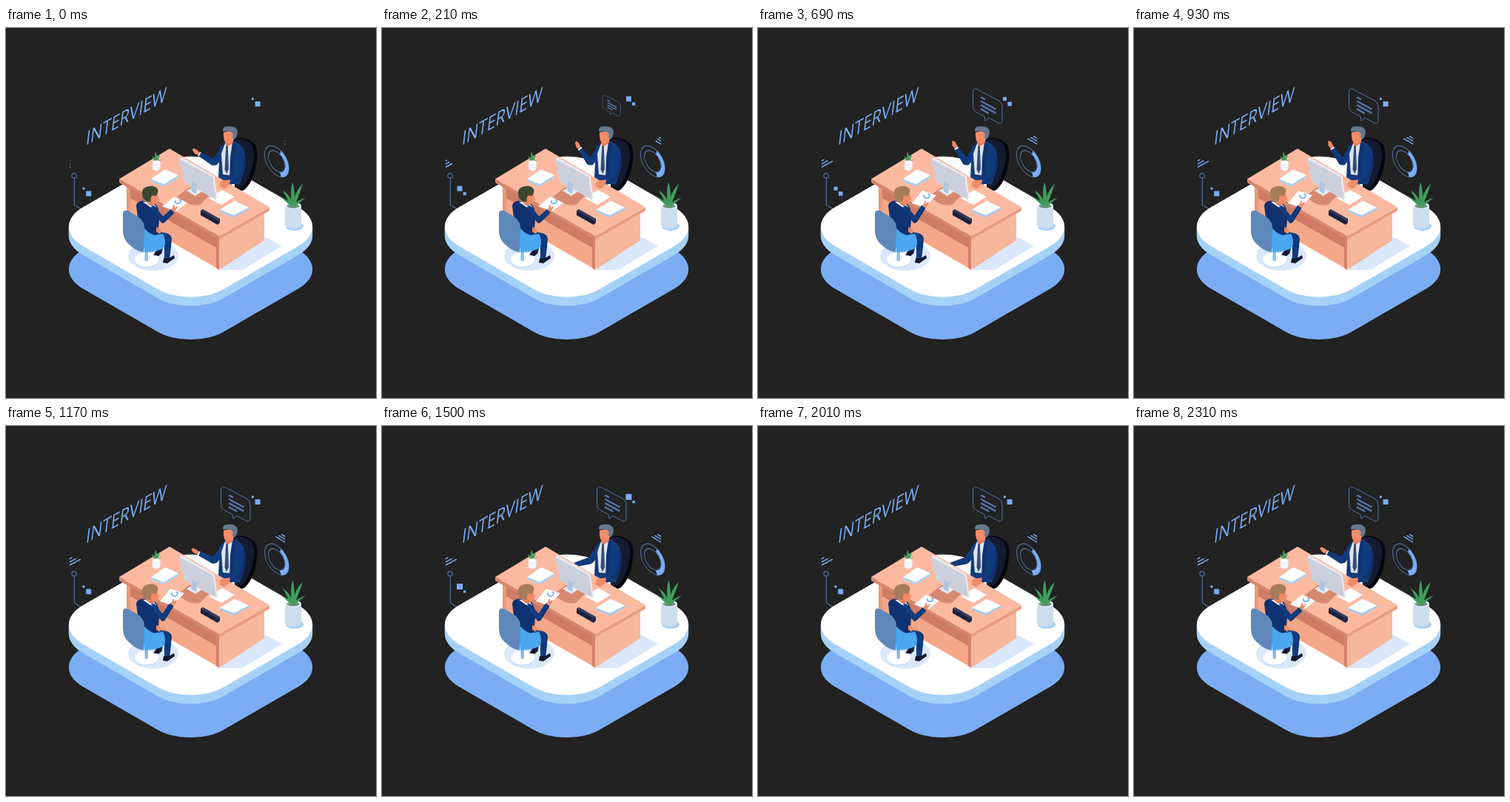
These frames come from a looping animation (500x500 px, 2370 ms). An HTML page with a canvas:

```html
<!DOCTYPE html>
<html lang="en">
<head>
<meta charset="utf-8">
<title>Interview</title>
<style>
  html, body { margin: 0; width: 100%; height: 100%; overflow: hidden; background: #222; }
  canvas { display: block; width: 500px; height: 500px; }
</style>
</head>
<body>
<canvas id="stage" width="500" height="500"></canvas>
<script>
const ctx = document.getElementById('stage').getContext('2d');
const LOOP = 2370;
const BLUE = '#7badf5', PALE = '#a6d1f7', SHADE = '#dbe8fb', NAVY = '#113b7d',
      DEEP = '#0f3270', SKIN = '#f08c67', GREEN = '#3f9d5b', DIM = '#5473a8';

const fill = (d, color) => { ctx.fillStyle = color; ctx.fill(new Path2D(d)); };

function line(d, color, width = 1) {
  ctx.strokeStyle = color;
  ctx.lineWidth = width;
  ctx.stroke(new Path2D(d));
}

function oval(x, y, rx, ry, color, turn = 0) {
  ctx.fillStyle = color;
  ctx.beginPath();
  ctx.ellipse(x, y, rx, ry, turn, 0, Math.PI * 2);
  ctx.fill();
}

function square(x, y, size) {
  ctx.fillStyle = BLUE;
  ctx.fillRect(x - size / 2, y - size / 2, size, size);
}

function within(matrix, draw) {
  ctx.save();
  ctx.transform(...matrix);
  draw();
  ctx.restore();
}

const shifted = (x, y, draw) => within([1, 0, 0, 1, x, y], draw);
const mix = (a, b, k) => a + (b - a) * k;

// Eased value between [time, value] keys
function track(t, keys) {
  if (t <= keys[0][0]) return keys[0][1];
  for (let i = 1; i < keys.length; i++) {
    const [t0, v0] = keys[i - 1], [t1, v1] = keys[i];
    if (t <= t1) {
      const k = (t - t0) / (t1 - t0);
      return mix(v0, v1, k * k * (3 - 2 * k));
    }
  }
  return keys[keys.length - 1][1];
}

function slab(y, color) {
  within([.866, .5, -.866, .5, 249.5, y], () => {
    ctx.fillStyle = color;
    ctx.beginPath();
    ctx.roundRect(-110.3, -110.3, 220.6, 220.6, 52);
    ctx.fill();
  });
}

function platform() {
  slab(326, BLUE);
  for (let y = 280.5; y > 268.5; y--) slab(y, PALE);
  slab(268.5, '#fff');
  fill('M345 283L350 282L373 294.5L319 327H288Z', SHADE);
  oval(199, 308, 34, 20, SHADE);
}

function title() {
  within([.785, -.44, -.12, 1, 107.3, 159], () => {
    ctx.font = '500 27px "Open Sans", "Noto Sans", sans-serif';
    ctx.fillStyle = BLUE;
    ctx.fillText('INTERVIEW', 0, 0);
  });
}

function bubble(scale) {
  if (scale < .01) return;
  within([scale, 0, 0, scale, 310, 103.4], () => {
    ctx.translate(-310, -104);
    line('M290.5 87Q290.5 81 296 83.5L324 98Q330 101 330 107V125Q330 131 325 129L312 122L307 126L306 120L296 115Q290.5 112 290.5 106Z', DIM);
    line('M301 94L307 97.3M301 99.3L321.5 110.3M301 104.7L321.5 115.7M301 110L312 116', DIM, 2.4);
  });
}

function donut() {
  within([.866, .5, 0, 1, 365.8, 180.2], () => {
    ctx.strokeStyle = DIM;
    ctx.lineWidth = 1.1;
    for (const r of [18.8, 13]) {
      ctx.beginPath();
      ctx.arc(0, 0, r, 0, Math.PI * 2);
      ctx.stroke();
    }
    ctx.strokeStyle = BLUE;
    ctx.lineWidth = 5.5;
    ctx.beginPath();
    ctx.arc(0, 0, 16.2, -1.2, 1.2);
    ctx.stroke();
  });
}

function decorations(t) {
  title();
  bubble(track(t, [[0, 0], [390, 1.1], [450, 1.1], [570, 1]]));
  donut();

  const grow = track(t, [[0, .06], [390, 1]]);
  for (const [y, length] of [[179.6, 3.5], [183.8, 8.5], [188, 15]]) {
    const l = length * grow;
    line(`M86 ${y}l${l} ${-l * .54}`, BLUE, 1.5);
  }
  for (const [y, length] of [[149.3, 5], [153, 9], [157, 13]]) {
    const l = length * grow;
    line(`M377.3 ${y}l${-l} ${-l * .58}`, BLUE, 1.4);
  }

  const swap = track(t % (LOOP / 2), [[0, 0], [300, 1], [570, 1], [785, 0]]);
  for (const [x, y] of [[333.4, 95.8], [105, 217]]) {
    square(x, y, mix(3, 8, swap));
    square(x + 6.7, y + 6.8, mix(7, 3.4, swap));
  }

  ctx.strokeStyle = DIM;
  ctx.lineWidth = 1.2;
  ctx.beginPath();
  ctx.arc(92, 199.5, 3.2, 0, Math.PI * 2);
  ctx.stroke();
  line('M92.3 203V239L103 245.5', DIM, 1.1);
}

function interviewer(t) {
  fill('M308 150Q322 145 334 155Q340 160 339.5 172Q338 203 323 218Q317 223 309 216Z', '#04060d');
  fill('M308 151Q320 147 330 155Q336 161 335 172Q333 200 319 216L309 214Z', '#151a31');

  const angle = track(t, [[0, 29], [260, 55], [1030, 55], [1340, -16], [2130, -16], [2335, 29]]) * Math.PI / 180;
  ctx.lineCap = ctx.lineJoin = 'round';
  line('M293 166L282.5 181', NAVY, 9);
  shifted(281.5, 181.5, () => {
    ctx.rotate(angle);
    fill('M2 -4.5L-22 -3V3L-1 5Q5 4 2 -4.5Z', NAVY);
    fill('M-22 -3H-24V3H-22Z', '#e5edf8');
    fill('M-24 -2Q-30 -4.5 -34 -2.5Q-35 0 -32 1L-29 2.5L-24 2Z', SKIN);
  });

  fill('M289 161L297 155L309 153Q319 157 322 166Q326 184 321 197L316 211L302 211L287 203Z', NAVY);
  fill('M296 156L305 154L308 160L304 199L293 198L291 170Z', '#dce5f1');
  fill('M297.5 159L300 159L300 163L301 191L298 197L295.5 191L297 163Z', '#344c78');
  fill('M306 154L311 157L306 200L302 208L303 175Z', DEEP);
  line('M319 176Q320 195 314 201L301 209', DEEP, 8);
  line('M317 170Q318 191 312 199L301 207', NAVY, 7);
  fill('M296 149H307V155L300 160L296 157Z', '#dd7656');
  fill('M294 141L305 139L309 147Q307 155 301 156.5Q295 156 294 148Z', SKIN);
  fill('M293 139.5Q292 133.5 299 133Q311 131.5 313 140Q313 147 308 151L306 148L307 143L303 140Z', '#64798f');
  ctx.lineCap = 'butt';
}

function leaf(x, y, tx, ty, width) {
  const bx = mix(x, tx, .4), by = mix(y, ty, .6);
  fill(`M${x - width / 3} ${y}Q${bx - width} ${by} ${tx} ${ty}Q${bx + width} ${by} ${x + width / 3} ${y}Z`, GREEN);
}

function floorPlant() {
  oval(390, 268, 12, 6, PALE);
  fill('M377 240H399V266Q397 271 388 271Q379 271 377 266Z', '#ccdeee');
  oval(388, 240, 11, 4.5, '#e4eef8');
  oval(388, 240.5, 8.5, 3, '#728f7c');
  for (const [x, y] of [[374, 219], [387, 208], [401, 210], [405, 229], [372, 229]]) leaf(388, 242, x, y, 4.2);
}

function desk() {
  // Left leg, front panel, underside shadow and right leg
  fill('M163 209L168 212V257L163 254Z', '#e39a80');
  fill('M168 212L284 279V324L168 257Z', '#f5a789');
  fill('M168 212L284 279V297L168 230Z', '#cf7b66');
  fill('M284 279L288 281V327L284 324Z', '#d5806a');
  fill('M288 282L349 247V287L288 327Z', '#f7b79c');
  fill('M153 204L288 281V286L153 209Z', '#d8866d');
  fill('M288 281L356 242V247L288 286Z', '#e79c81');
  fill('M153 204L221 163L356 242L288 281Z', '#fbbaa0');
}

function deskItems() {
  fill('M196 204L215 191L233 199V202L213 214L196 207Z', PALE);
  fill('M196 204L215 191L233 199L213 211Z', '#fff');

  for (const [x, y] of [[197, 173], [202, 167], [208, 170], [210, 178]]) leaf(203, 182, x, y, 2.6);
  fill('M198 181H208.5V190Q207 193 203 193Q199 193 198 190Z', '#eef4fb');
  oval(203.2, 181, 5.2, 2, '#fff');

  fill('M274 230L292 219L309 228L291 239Z', '#fff');
  fill('M289 245.5L309 233.5L328 242.5V245.5L308 256L289 248.5Z', '#a5c9ef');
  fill('M289 245.5L309 233.5L328 242.5L308 253Z', '#fff');

  fill('M263 247L266 245L289 258V263L286 266L263 253Z', '#1d2340');
  fill('M263 247L266 245L289 258L286 260Z', '#333c60');

  // Resting hand
  fill('M303 205L293 206Q287 209 289 214L295 218L302 212Z', SKIN);

  // Monitor
  fill('M231 228L248 215L275 226L262 239Q250 241 240 234Z', '#d78870');
  fill('M244 220L256 213L266 220L256 227Z', '#e8edf5');
  fill('M250 204L259 209L257 224L250 220Z', '#afc4dc');
  fill('M234 177L237 174.5L281.5 200L286 230L283.5 232L241 208Z', '#e6e9f2');
  fill('M234 177L279.5 202L284 232L241 208Z', '#cbcedb');
  fill('M251 207L258.5 211.5L257 222L251 219Z', '#b1c5db');
}

function candidate(t) {
  const lift = track(t, [[400, 0], [660, 1], [1680, 1], [1960, 0]]);
  const at = (x0, y0, x1, y1) => `${mix(x0, x1, lift)} ${mix(y0, y1, lift)}`;

  // Sheet with a ring chart
  fill(`M${at(211, 241, 208, 237)}L${at(227, 228, 222, 220)}L${at(245, 236, 241, 226)}L${at(230, 248, 226, 242)}Z`, '#fff');
  ctx.strokeStyle = BLUE;
  ctx.lineWidth = 1.8;
  ctx.beginPath();
  ctx.ellipse(mix(232.5, 228, lift), mix(234.5, 227, lift), 4, mix(2.5, 3, lift), -.2, -1, 4);
  ctx.stroke();

  // Chair foot
  oval(190, 315, 16, 9.5, '#c8def6');
  oval(190, 313, 16, 9.5, '#fff');
  fill('M187.5 300H192V314Q190 316 187.5 314Z', '#8dbdec');

  // Legs
  ctx.lineCap = ctx.lineJoin = 'round';
  line('M197 281L209 283L207 302', DEEP, 8);
  fill('M203 301L211 301L207 308L199 307Z', '#151a30');
  fill('M189 277L208 276Q222 276 224 284L223 296L221 313L214 313L214 293L194 297Z', NAVY);
  fill('M213 311L220 311L227 307L228 311L218 318L212 317Z', '#151a30');

  // Torso
  fill('M176 240Q177 234 185 233.5L200 236Q208 243 207 258L206 272L207 284L190 285L178 256Z', DEEP);
  fill('M185 235L197 234L203 242L198 244Z', '#f1f5fb');
  fill('M189 231H200V238L197 241L190 236Z', '#d97556');
  fill('M203 269L208 271L211 275L207 278L203 275Z', SKIN);

  // Chair seat and back
  fill('M183 266Q190 276 200 280L212 278Q217 287 214 296Q206 303 187 303Z', '#4aa8f0');
  fill('M158 250Q159 245 165 247L180 256Q188 262 187 274L186 303Q176 302 167 293Q158 286 158 274Z', '#5f88ba');

  // Arm
  const wristX = mix(223.5, 222.5, lift), wristY = mix(249, 243.5, lift);
  line(`M200 245L212 260L${wristX} ${wristY}`, DEEP, 7);
  line(`M199 243L211 259L${wristX} ${wristY}`, NAVY, 5.5);
  shifted(wristX, wristY, () => fill('M0 -3L2 -7L3 -10L4.5 -10L4.5 -6L8 -9L8 -6L4 0Z', SKIN));
  ctx.lineCap = 'butt';

  // Head
  shifted(-2.3, 0, () => {
    fill('M190 225L206 222L209 231Q208 237 202 238L193 235Z', SKIN);
    const hair = t < 555 ? '#3d4833' : '#a67c59';
    fill('M186 224Q186 215 195 214Q202 212 207 217Q209 222 205 227L201 226L198 230L198 235Q187 235 186 224Z', hair);
    oval(200, 229.5, 1.6, 2.4, SKIN);
  });
}

function frame(now) {
  const t = now % LOOP;
  ctx.fillStyle = '#222';
  ctx.fillRect(0, 0, 500, 500);
  decorations(t);
  platform();
  interviewer(t);
  floorPlant();
  desk();
  deskItems();
  candidate(t);
}

const start = performance.now();
function tick() {
  frame(performance.now() - start);
  requestAnimationFrame(tick);
}
tick();
</script>
</body>
</html>
```
